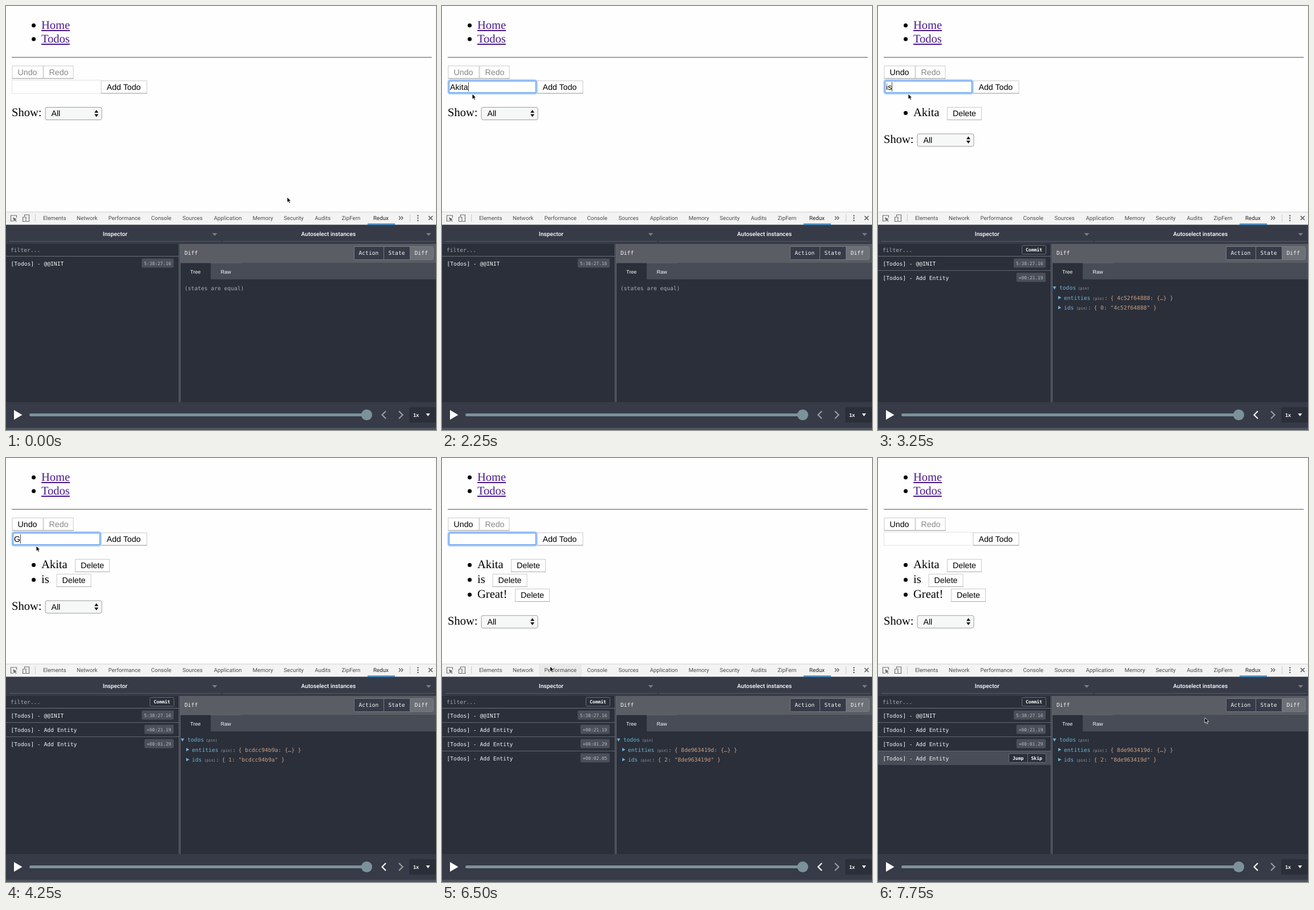
An HTML page for the animation above (8 s loop, 754x743 px).

```html
<!DOCTYPE html>
<html lang="en">
<head>
<meta charset="utf-8">
<title>Todo list with history panel</title>
<style>
  html, body { margin: 0; width: 100%; height: 100%; overflow: hidden; background: #fefefe; }
  svg { display: block; width: 754px; height: 743px; }
  text { white-space: pre; text-rendering: geometricPrecision; }
  .serif { font: 20.5px "Liberation Serif", Times, serif; }
  .ui { font: 14.2px "Liberation Sans", Arial, sans-serif; }
  .tab { font: 9.75px Roboto, sans-serif; fill: #4e4e4e; }
  .head { font: 500 10.2px Roboto, sans-serif; fill: #fff; }
  .sub { font: 9px "Liberation Sans", Arial, sans-serif; fill: #fff; }
  .mono { font: 9.65px "DejaVu Sans Mono", monospace; fill: #f2f3f4; }
  .time { font: 7.9px "DejaVu Sans Mono", monospace; fill: #b9bcc1; }
  .bold { font: bold 8px "DejaVu Sans Mono", monospace; fill: #fff; }
  .pin { font: 6.7px "DejaVu Sans Mono", monospace; fill: #9a9ea6; }
  .key { fill: #6fb3d2; }
  .val { fill: #cf9f83; }
  .dim { fill: #a9acb3; }
  .off { fill: #868686; }
  .link { fill: #4b1a8c; text-decoration: underline; text-decoration-thickness: 1.3px; }
</style>
</head>
<body>
<svg id="stage" viewBox="0 0 754 743">
  <g id="base"></g>
  <g id="live"></g>
  <path id="pointer" d="M0 0V9.4L2.2 7.4L3.7 10.8L5.4 10L3.9 6.8H6.8Z" fill="#000" stroke="#fff" stroke-width=".8"/>
</svg>
<script>
const $ = id => document.getElementById(id);

const text = (x, y, cls, s) => `<text x="${x}" y="${y}" class="${cls}">${s}</text>`;
const rect = (x, y, w, h, fill, extra = '') =>
  `<rect x="${x}" y="${y}" width="${w}" height="${h}" fill="${fill}" ${extra}/>`;
const path = (d, fill, extra = '') => `<path d="${d}" fill="${fill}" ${extra}/>`;
const line = (d, color, width = 1) => path(d, 'none', `stroke="${color}" stroke-width="${width}"`);
const dot = (x, y, r, fill) => `<circle cx="${x}" cy="${y}" r="${r}" fill="${fill}"/>`;
const outlined = (x, y, w, h, fill, color, r = 0) =>
  rect(x, y, w, h, fill, `stroke="${color}" rx="${r}"`);

const PANE = '#2a2f3a', BAR = '#363b47', EDGE = '#686d77';

const button = (x, y, w, label, on = true) =>
  outlined(x + .5, y + .5, w - 1, 22, '#fff', '#c9c9c9') +
  line(`M${x} ${y + 22.5}h${w}`, '#aaa') +
  text(x + 10, y + 16, on ? 'ui' : 'ui off', label);

function drawBase() {
  let s = rect(0, 0, 754, 743, '#fefefe');
  ['Home', 'Todos'].forEach((name, i) => {
    s += dot(48.5, 34 + 24 * i, 3.5, '#000') + text(62, 40 + 24 * i, 'serif link', name);
  });
  s += line('M10 90H746.5', '#858585', 1.3) + button(166.5, 130.5, 81, 'Add Todo');

  // Browser tool tabs
  s += rect(0, 360.5, 754, 23, '#f3f3f3') + line('M0 361H754', '#d2d2d2');
  s += '<g id="hover"></g>';
  s += line('M13 377H8.5V367H18.5V371', '#6e6e6e', 1.2) +
    path('M12 370L19 373.5L16.4 374.4L18.8 377L17.6 378L15.3 375.5L14.2 378Z', '#6e6e6e');
  s += line('M32.5 369V366H40.5V377.5H36M29.5 370H35V377.5H29.5Z', '#6e6e6e', 1.2);
  s += line('M51.5 365V378M708.5 365V378', '#ccc');
  const tabs = { Elements: 65, Network: 124, Performance: 179.5, Console: 254.5, Sources: 309.5,
    Application: 364.5, Memory: 432.5, Security: 487, Audits: 541.5, ZipFern: 588.5 };
  for (const name in tabs) s += text(tabs[name], 375, 'tab', name);
  s += `<text x="644" y="375" class="tab" style="fill:#222">Redux</text>`;
  s += rect(634, 381, 48, 2.3, '#3d9be8');
  s += line('M689 368.5L692 371.5L689 374.5M693 368.5L696 371.5L693 374.5', '#555', 1.2);
  for (const y of [367.5, 371.7, 375.9]) s += dot(722.3, y, 1.2, '#555');
  s += line('M741 368L748 375M748 368L741 375', '#555', 1.5);

  // Panel headings
  s += rect(0, 383.3, 754, 34, BAR) + line('M6 412.5H377M380 412.5H752', '#555b67');
  s += text(169.8, 402.5, 'head', 'Inspector') + text(517.5, 402.5, 'head', 'Autoselect instances');
  s += path('M361.5 398h9l-4.500 4.700zM736.500 398h9l-4.500 4.700z', '#787d87');

  // Action list and diff view
  s += rect(0, 417, 754, 277, PANE) + text(8, 431, 'mono dim', 'filter...');
  s += line('M0 438.5H303', '#6b707a');
  s += rect(306, 417, 448, 33, '#5a5d64') + rect(306, 450, 448, 29, '#484c56') +
    line('M306 450.2H412', '#646870') + rect(306, 450.5, 53, 29, PANE);
  s += line('M303.5 417V694M305.5 417V694', '#6c717b');
  s += text(313, 436, 'mono', 'Diff');
  s += outlined(610.5, 421.5, 139, 23, BAR, '#777b83', 2) + rect(709, 422, 40, 22, '#6d7077') +
    line('M662.5 421.5V444.5M708.5 421.5V444.5', '#777b83');
  s += text(618.5, 436, 'mono', 'Action') + text(670.5, 436, 'mono', 'State') + text(716.5, 436, 'mono', 'Diff');
  s += text(323, 468.5, 'sub', 'Tree') + text(376.5, 468.5, 'sub', 'Raw');

  // Player
  s += rect(0, 694, 754, 45, BAR) + rect(0, 739, 754, 4, '#4c535e');
  s += path('M14 708L28.500 716.500L14 725Z', '#fff');
  s += rect(41, 714, 592, 5, '#7c929b', 'rx="2.500"') + dot(632.5, 716.5, 9.6, '#7c929b');
  s += line('M689 710L695.500 716.500L689 723', '#989ca4', 2.2);
  s += rect(707, 703, 47, 27, PANE, 'rx="2"') +
    '<text x="714" y="720" class="sub" style="font-weight:bold">1x</text>' +
    path('M736.500 714h7l-3.500 5z', '#fff');
  $('base').innerHTML = s;
}

const todos = [
  { name: 'Akita', at: 121, time: '+00:21.19', id: '4c52f64888' },
  { name: 'is', at: 88.5, time: '+00:01.29', id: 'bcdcc94b9a' },
  { name: 'Great!', at: 128, time: '+00:02.05', id: '8de963419d' },
];

function drawPage({ count, typed, focus, caret }) {
  let s = button(10.5, 104.5, 55, 'Undo', count > 0) + button(65.5, 104.5, 53, 'Redo', false);
  s += focus
    ? outlined(11.5, 130.5, 154, 22.5, '#fff', '#b9d5fa', 3).replace('/>', ' stroke-width="4.500"/>') +
      outlined(12.3, 131.3, 152.4, 20.9, '#fff', '#7db0f3', 1.5).replace('/>', ' stroke-width="2.200"/>')
    : outlined(10.5, 130, 156, 23, '#fff', '#e2e2e2');
  s += `<text id="typed" x="14" y="146.500" class="ui">${typed}</text>`;
  if (focus && caret) s += '<path id="caret" d="M.5 133.500V150" stroke="#444"/>';

  todos.slice(0, count).forEach((todo, i) => {
    const y = 26 * i;
    s += dot(48.5, 187.5 + y, 3.5, '#000') + text(62, 193 + y, 'serif', todo.name) +
      button(todo.at, 177 + y, 61, 'Delete');
  });

  const drop = count ? 20.5 + 26 * count : 0;
  s += `<g transform="translate(0 ${drop})">` + text(10, 193, 'serif', 'Show:') +
    outlined(69, 177.5, 99, 22, '#f6f7f7', '#9c9c9c', 3) + text(79.5, 193, 'ui', 'All') +
    path('M155 187h7l-3.500-5zM155 189.500h7l-3.500 5z', '#111') + '</g>';
  return s;
}

function drawRow(label, time, i, count, hover) {
  const y = 25 * i, w = time.length * 4.75 + 8.5;
  let s = hover ? rect(0, 439 + y, 303, 24, '#484d58') : '';
  if (i < count) s += line(`M0 ${463.5 + y}H303`, '#626771');
  s += text(8.5, 454.5 + y, 'mono', '[Todos] - ' + label);
  if (!hover) return s + rect(294 - w, 442.5 + y, w, 16, '#4a4f59', 'rx="2"') + text(298 - w, 453.5 + y, 'time', time);
  return s + outlined(229.5, 443 + y, 65, 15.5, PANE, EDGE, 2) + line(`M262.5 ${443 + y}v15.500`, EDGE) +
    text(236, 453.5 + y, 'bold', 'Jump') + text(268.5, 453.5 + y, 'bold', 'Skip');
}

function drawPanel({ count, row }) {
  let s = drawRow('@@INIT', '5:38:27.16', 0, count);
  todos.slice(0, count).forEach((todo, i) => {
    s += drawRow('Add Entity', todo.time, i + 1, count, row === i + 1);
  });
  s += line('M666 710L659.500 716.500L666 723', count ? '#fff' : '#989ca4', 2.2);
  if (!count) return s + text(313, 497.5, 'mono dim', '(states are equal)');

  const { id } = todos[count - 1];
  s += outlined(252.5, 419.5, 42, 15.5, PANE, EDGE, 2) + text(259, 430, 'bold', 'Commit');
  s += path('M306.500 491.500h6l-3 5.500zM316 508l5.500 3l-5.500 3zM316 525.500l5.500 3l-5.500 3z', '#6fb3d2');
  s += text(318, 497, 'mono key', 'todos') + text(350.5, 497, 'pin', '(pin)');
  s += text(326, 514.5, 'mono key', 'entities') + text(376.5, 514.5, 'pin', '(pin)') +
    text(397, 514.5, 'mono key', ':') + text(407.5, 514.5, 'mono val', `{ ${id}: {…} }`);
  s += text(326, 532, 'mono key', 'ids') + text(347.5, 532, 'pin', '(pin)') +
    text(368, 532, 'mono key', ':') + text(378.5, 532, 'mono val', `{ ${count - 1}: "${id}" }`);
  return s;
}

const LOOP = 8000;
// Each step changes only the listed parts of the state
const steps = [
  [0, { x: 493, y: 335, count: 0, typed: '', focus: false, caret: true, row: 0, tab: false }],
  [250, { x: 420, y: 300 }],
  [500, { x: 195, y: 208 }],
  [750, { x: 53, y: 154 }],
  [1000, { focus: true }],
  [1500, { typed: 'A' }],
  [1750, { typed: 'Ak' }],
  [2000, { typed: 'Aki' }],
  [2250, { typed: 'Akita' }],
  [2500, { typed: '', count: 1 }],
  [3000, { typed: 'i' }],
  [3250, { typed: 'is' }],
  [3750, { typed: '', count: 2 }],
  [4250, { typed: 'G' }],
  [4500, { typed: 'Gr' }],
  [4750, { typed: 'Grea' }],
  [5000, { typed: 'Great' }],
  [5500, { typed: 'Great!' }],
  [5750, { typed: '', count: 3 }],
  [6250, { x: 75, y: 185, caret: false }],
  [6500, { x: 189.5, y: 365, tab: true }],
  [6750, { x: 330, y: 500, tab: false }],
  [7000, { x: 390, y: 545 }],
  [7250, { x: 340, y: 535 }],
  [7500, { x: 215, y: 526, focus: false, row: 3 }],
  [7750, { x: 573, y: 455 }],
];

let shown = -1;

function show(now) {
  const t = now % LOOP;
  const n = steps.filter(([at]) => at <= t).length;
  if (n !== shown) {
    shown = n;
    const state = Object.assign({}, ...steps.slice(0, n).map(step => step[1]));
    $('live').innerHTML = drawPage(state) + drawPanel(state);
    $('hover').innerHTML = state.tab ? rect(170, 361.5, 75, 22, '#e9e9e9') : '';
    $('pointer').setAttribute('transform', `translate(${state.x} ${state.y})`);
    if ($('caret')) {
      const x = Math.round(14 + $('typed').getComputedTextLength());
      $('caret').setAttribute('transform', `translate(${x} 0)`);
    }
  }
}

drawBase();
const start = performance.now();
function tick() {
  show(performance.now() - start);
  requestAnimationFrame(tick);
}
tick();
</script>
</body>
</html>
```
